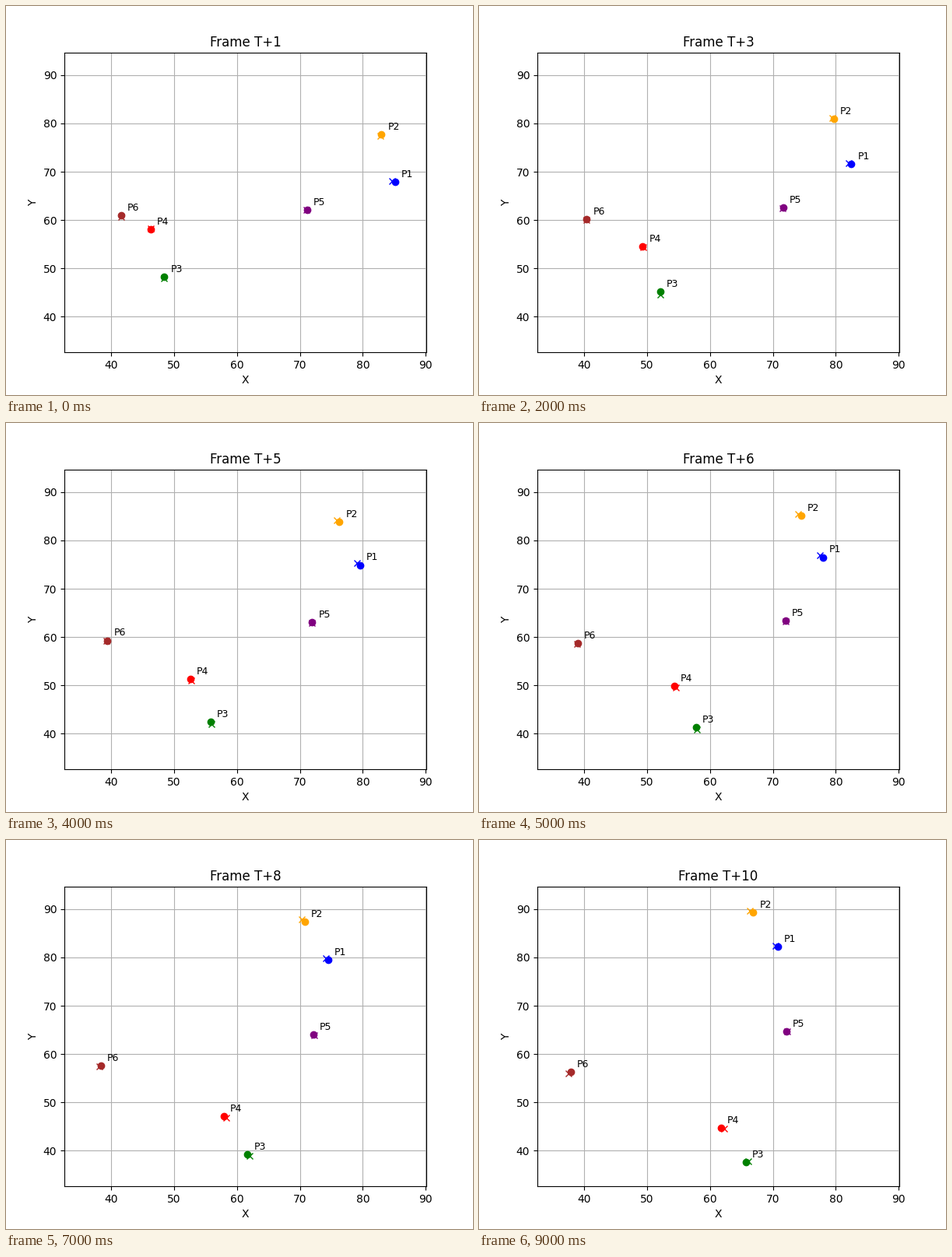
A matplotlib script that plays this animation: 600x500 px, repeating every 10000 ms.

```python
import matplotlib.pyplot as plt
from matplotlib.animation import FuncAnimation

STEPS = 10
LABEL_SHIFT = 1 + 1j

# Points are x + yj in data units. Each dot runs from start to stop, bending
# aside by bow halfway; its cross begins and ends at the two gaps from the dot.
# name, colour, start, stop, bow, first gap, last gap
PATHS = [
    ("P1", "blue", 85.10 + 67.91j, 70.77 + 82.24j, 0.80 + 0.64j, -0.47 + 0.08j, -0.37 + 0.10j),
    ("P2", "orange", 82.97 + 77.68j, 66.87 + 89.33j, 0.47 + 0.95j, -0.22 - 0.27j, -0.58 + 0.31j),
    ("P3", "green", 48.42 + 48.21j, 65.72 + 37.64j, -0.29 - 1.05j, -0.35j, 0.40 + 0.10j),
    ("P4", "red", 46.30 + 58.08j, 61.77 + 44.69j, -0.61 - 0.84j, 0.13j, 0.45 - 0.10j),
    ("P5", "purple", 71.17 + 62.11j, 72.16 + 64.69j, 0.33 - 0.22j, -0.12, 0.15 + 0.02j),
    ("P6", "brown", 41.59 + 60.97j, 37.88 + 56.28j, -0.53 + 0.38j, -0.25j, -0.33 - 0.27j),
]


def bend(start, stop, bow, s):
    return start + (stop - start) * s + bow * 4 * s * (1 - s)


def place(marker, z):
    marker.set_data([z.real], [z.imag])


fig, ax = plt.subplots(figsize=(6, 5), dpi=100)
ax.set_xlim(32.555, 90.1)
ax.set_ylim(32.64, 94.64)
ax.set_xlabel("X")
ax.set_ylabel("Y")
ax.grid(True)
title = ax.set_title("")

dots, crosses, labels = [], [], []
for name, color, *_ in PATHS:
    dots += ax.plot([], [], "o", color=color)
    crosses += ax.plot([], [], "x", color=color)
    labels.append(ax.text(0, 0, name, fontsize=9))


def draw(i):
    s = i / (STEPS - 1)
    title.set_text(f"Frame T+{i + 1}")
    for path, dot, cross, label in zip(PATHS, dots, crosses, labels):
        start, stop, bow, gap_in, gap_out = path[2:]
        z = bend(start, stop, bow, s)
        place(dot, z)
        # Crosses swing further out vertically than the dots.
        place(cross, z + bend(gap_in, gap_out, 0.4j * bow.imag, s))
        corner = z + LABEL_SHIFT
        label.set_position((corner.real, corner.imag))
    return [title, *dots, *crosses, *labels]


anim = FuncAnimation(fig, draw, frames=STEPS, interval=1000, repeat=True, repeat_delay=0)
plt.show()
```
